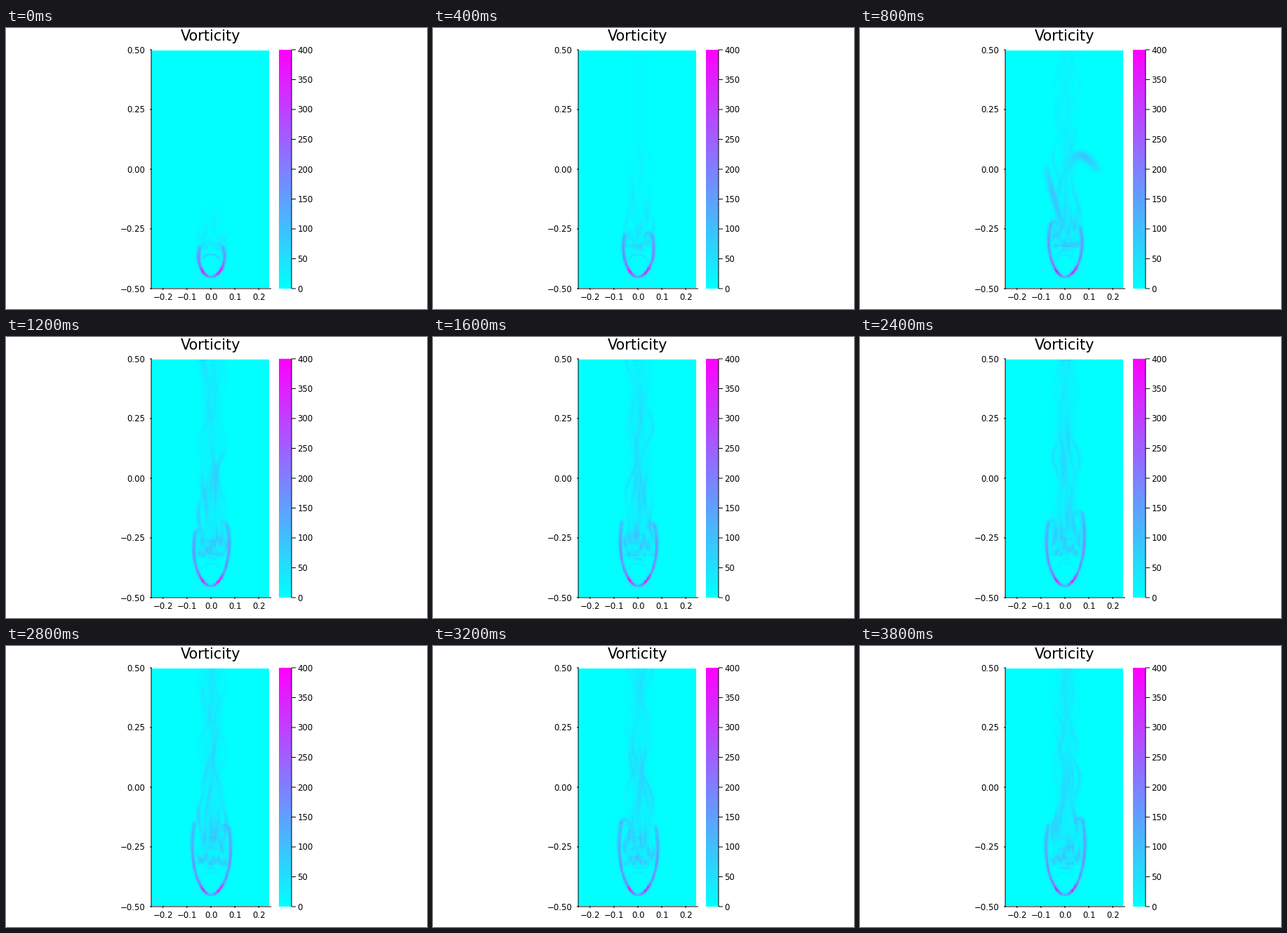
Recreate the animation shown at these times as a matplotlib script. Size 600 by 400 pixels, loop 4000 ms.

```python
import numpy as np
import matplotlib.pyplot as plt
from matplotlib.animation import FuncAnimation

W, H, DPI = 600, 400, 100
FRAMES, STEP = 20, 200
PT = 72 / DPI
MINUS = str.maketrans("-", "\u2212")
plt.rcParams["font.family"] = "DejaVu Sans"

# Heat map cells, in stage pixels with y pointing down.
LEFT, RIGHT, TOP, BOTTOM = 207, 375, 32, 370
NX, NY = 99, 199
X = np.linspace(LEFT, RIGHT, NX, endpoint=False) + (RIGHT - LEFT) / NX / 2
Y = np.linspace(TOP, BOTTOM, NY, endpoint=False) + (BOTTOM - TOP) / NY / 2

# The cylinder the flow passes.
CX, CY, BASE = 292, 338, 354.5


def sigmoid(x):
    return 1 / (1 + np.exp(-np.clip(x, -50, 50)))


def brush(x, y, power, width):
    """Strongest Gaussian dab along a curve."""
    x, y, power, width = (a[:, None] for a in np.broadcast_arrays(x, y, power, width))
    gx = np.exp(-((X - x) / width) ** 2)
    gy = np.exp(-((Y - y) / width) ** 2) * power
    field = np.zeros((NY, NX))
    for col, row in zip(gy, gx):
        np.maximum(field, np.outer(col, row), out=field)
    return field


# Time in steps that the flow needs from the shoulders up to each height.
RISE = np.arange(310, 18, -2.0)
climb = np.clip((322 - RISE) / 90, 0, 1)
AGE = np.cumsum(2 / (5 + 105 * climb**2 * (3 - 2 * climb)))
AGE -= np.interp(-290, -RISE, AGE)

# Vortex sheets: each has its own place, wave and pulse.
rng = np.random.default_rng(11)
SHEETS = [dict(off=off, wave=rng.uniform(0.8, 1.4), pulse=rng.uniform(0.9, 1.7),
               phase=rng.uniform(0, 2 * np.pi, 2), width=rng.uniform(2.4, 4.4))
          for off in np.linspace(-19, 19, 8)]


def sheet(k, off, wave, pulse, phase, width):
    """Everything released from one point of the wake, carried upwards."""
    born = k - AGE
    far = np.clip((290 - RISE) / 110, 0, 1)
    sway = (1 + 4 * far) * (0.5 + abs(off) / 19)
    x = CX + 2 + off * (1 - 0.4 * far) + sway * np.sin(2 * np.pi * born / wave + phase[0])
    beat = 0.5 + 0.5 * np.sin(2 * np.pi * born / pulse + phase[1])
    power = (0.25 + 0.75 * beat**2) * (12 + 78 * np.exp(-(290 - RISE) / 170))
    power *= np.clip((born + 1) / 6, 0.35, 1)
    first = -0.5 + 1.3 * (1 - np.exp(-k))
    return brush(x, RISE, power * sigmoid((born - first) / 0.08), width)


def shell(k, side):
    """Shear layer around the body, with a curl at its tip."""
    grown = 1 - np.exp(-k / 5)
    tip = 313 - 62 * (1 - np.exp(-k / 6)) - side * 7 * grown * np.cos(np.pi * k / 3)
    half = 17.5 + 9.5 * grown + (1 + side) * 0.9
    v = np.linspace(0, 1, 100) ** 2
    s = (BASE - tip) * v
    x = CX + side * half * (1 - (1 - v / 0.7) ** 2) ** 0.55
    power = (220 - 30 * grown - 100 * v**3
             + 180 * np.exp(-((s - 8) / 6) ** 2) - 90 * np.exp(-(s / 2.5) ** 2))
    layer = brush(x, BASE - s, power, 1.9 + 1.3 * v**2)

    a = np.linspace(0, 1.3 * np.pi, 20)
    r = 6 - 0.8 * a
    turn = 0.6 + 0.4 * side * np.sin(np.pi * k / 3)
    curl = brush(x[-1] + side * (r * np.cos(a) - 6), tip - r * np.sin(a),
                 110 * turn * (1 - a / 7), 3)
    return np.hypot(layer, curl)


def ripples(k):
    """Weak arcs trapped between the body and the tips."""
    r = np.random.default_rng(k)
    s = np.linspace(-1, 1, 16)
    return [brush(CX + 1 + r.uniform(-3, 3) + r.uniform(7, 12) * s,
                  y + r.uniform(-5, 5) * s**2 + r.uniform(-3, 3) * s,
                  r.uniform(25, 80) * (1 - 0.6 * s**2), 2.2)
            for y in np.linspace(318 - 45 * min(1, k / 10), 316, 4)]


def roll_up(k):
    """The first eddy to break away, passing mid-height at step 4."""
    s = np.linspace(0, 1, 50)
    head = 300 + 38 * s, 197 - 17 * np.sin(np.pi * s**0.7) + 3 * s
    tail = 266 + 25 * s**1.2, 198 + 90 * s
    parts = []
    for (x, y), width in ((head, 6.5), (tail, 5)):
        age = np.interp(-y, -RISE, AGE) + k - 4
        power = 95 * (1 - 0.25 * abs(k - 4)) * (0.4 + 0.6 * np.sin(np.pi * s))
        parts.append(brush(x, np.interp(age, AGE, RISE), power, width))
    return parts


radius = np.hypot(X - CX, Y[:, None] - CY)
outside = sigmoid((radius - 15.5) / 0.7)
cap = np.exp(-((radius - 15.7) / 1.4) ** 2) * np.clip((334 - Y[:, None]) / 8, 0, 1)
haze = 18 * np.exp(-((X - CX - 2) / 15) ** 2) * sigmoid((300 - Y[:, None]) / 10)


def vorticity(k):
    parts = [sheet(k, **s) for s in SHEETS]
    parts.append(haze * min(1, k / 6))
    if k > 1:
        parts += ripples(k)
    if 3 <= k <= 6:
        parts += roll_up(k)
    parts = [p * outside for p in parts]
    parts += [np.maximum(shell(k, -1), shell(k, 1)), cap * (25 + 60 * np.exp(-k / 3))]
    return np.sqrt(sum(p**2 for p in parts))


fig = plt.figure(figsize=(W / DPI, H / DPI), dpi=DPI, facecolor="white")
ax = fig.add_axes([0, 0, 1, 1])
ax.axis("off")


def line(x, y):
    ax.plot(x, y, color="black", lw=PT, solid_capstyle="butt", snap=False, zorder=3)


def label(x, y, text, size=11.7, **kw):
    ax.text(x, y, text.translate(MINUS), fontsize=size * PT, va="center_baseline", **kw)


image = ax.imshow(np.zeros((NY, NX)), cmap="cool", vmin=0, vmax=400, aspect="auto",
                  interpolation="nearest", extent=(LEFT, RIGHT, BOTTOM, TOP))
ax.imshow(np.linspace(1, 0, 256)[:, None], cmap="cool", aspect="auto",
          extent=(389, 407, 371, 31))
ax.set(xlim=(0, W), ylim=(H, 0))

label(CX, 10.5, "Vorticity", 20.8, ha="center")
line([207, 207], [31, 371.5])
line([206.5, 378], [371, 371])
line([407, 407], [31, 371])
for v in np.linspace(-0.5, 0.5, 5):
    y = 201 - 340 * v
    line([205, 208], [y, y])
    label(198.5, y - 0.5, f"{v:.2f}", ha="right")
for v in np.linspace(-0.2, 0.2, 5):
    x = CX + 341 * v
    line([x, x], [370, 373])
    label(x, 382, f"{v:.1f}", ha="center")
for v in range(0, 401, 50):
    y = 371 - 0.85 * v
    line([407, 413], [y, y])
    label(415.5, y - 0.5, str(v), ha="left")


def update(k):
    image.set_data(vorticity(k))
    return [image]


anim = FuncAnimation(fig, update, frames=FRAMES, interval=STEP, repeat=True, repeat_delay=0)
plt.show()
```
